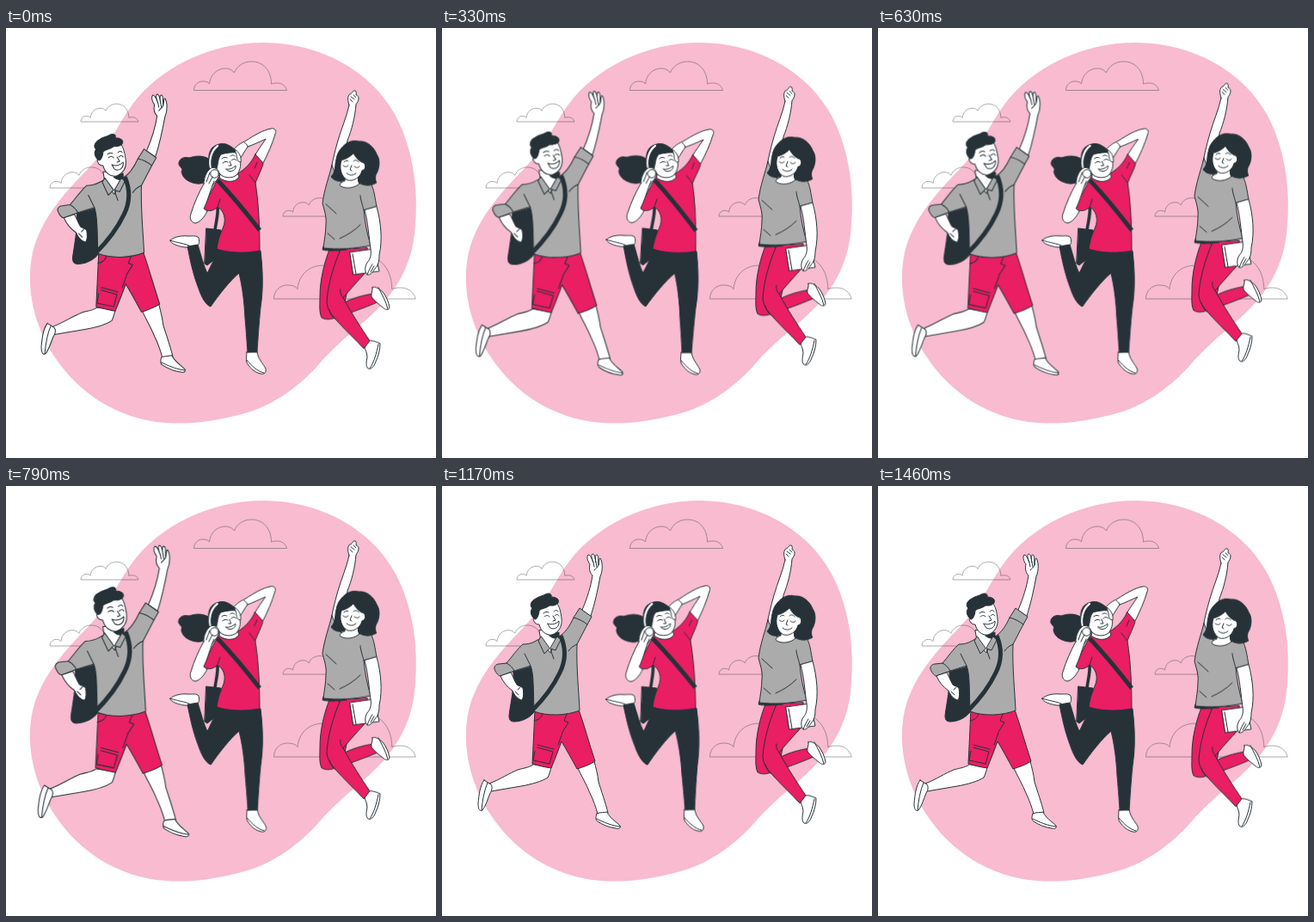
These frames come from a looping animation (500x500 px, 1.5 s). An HTML page:

```html
<!DOCTYPE html>
<html lang="en">
<head>
<meta charset="utf-8">
<title>Jumping students</title>
<style>
html, body { margin: 0; width: 100%; height: 100%; overflow: hidden; background: #fff; }
svg { display: block; width: 100%; height: 100%; }
.fig path, .fig circle { stroke: #263238; stroke-width: 1; stroke-linejoin: round; stroke-linecap: round; }
.fig .w { fill: #fff; }
.fig .g { fill: #ababab; }
.fig .p { fill: #e91e63; }
.fig .d { fill: #263238; }
.fig .n { fill: none; }
.fig .strap { fill: none; stroke-width: 5; stroke-linecap: butt; }
.fig .handle { fill: none; stroke-width: 3.6; stroke-linecap: butt; }
.fig .band { fill: none; stroke: #fff; stroke-width: 2.2; }
.clouds use { fill: none; stroke: #263238; stroke-width: .8; opacity: .5; }
#cloud { vector-effect: non-scaling-stroke; }
#man { transform-origin: 120px 244px; }
#girl { transform-origin: 252px 260px; }
</style>
</head>
<body>
<svg viewBox="0 0 500 500">
<defs>
  <path id="cloud" d="M0 0C0-6.500 5-10.500 10-10.500C14-10.500 17-9.500 18-7.500C19-18.500 27-25.500 37-25.500C41-25.500 45-23.500 47-20.500C50-28.500 58-33.500 67-33.500C81-33.500 90-22.500 90-7.500C92-8.500 95-8.500 97-8.500C103-8.500 107-4.500 108 0Z"/>
</defs>

<path fill="#f8bbd0" d="M300 17C365 17 425 50 453 102C476 146 480 196 475 240C470 284 446 316 418 340C396 359 378 374 362 393C338 420 306 441 274 449C240 458 212 461 185 459C130 455 84 424 57 383C33 347 22 302 31 261C41 220 71 189 96 163C121 137 131 110 147 89C178 47 236 17 300 17Z"/>

<g class="clouds">
  <use href="#cloud" transform="translate(218.500 72.500)"/>
  <use href="#cloud" transform="translate(87 109) scale(.62)"/>
  <use href="#cloud" transform="translate(51 186) scale(.72)"/>
  <use href="#cloud" transform="translate(322 219) scale(.64)"/>
  <use href="#cloud" transform="translate(311.500 315) scale(1.525)"/>
</g>

<g class="fig" id="man">
  <!-- legs and shoes -->
  <path class="w" d="M106 324C100 328 94 328 88 330C78 334 68 341 55 346L57 355L92 349C104 347 117 343 123 339C125 335 126 331 127 327Z"/>
  <path class="w" d="M49 342C52 344 55 346 57 347C59 350 58 354 56 357C53 364 51 372 47 377C43 379 42 374 42 369C43 359 44 349 49 342Z"/>
  <path class="n" d="M53 345C49 354 47 366 46 377"/>
  <path class="w" d="M158 328C162 337 168 347 172 357C176 365 179 374 181 381L193 380C190 368 185 354 182 344C181 335 179 328 177 320Z"/>
  <path class="w" d="M180 381C184 379 189 380 192 379C195 386 202 390 207 395C208 398 206 399 202 398C194 397 187 394 181 390C178 388 179 384 180 381Z"/>
  <path class="n" d="M180 387C188 391 197 395 207 396"/>
  <!-- shorts -->
  <path class="p" d="M108 260C107 282 106 303 105 323C112 325 119 327 127 328C131 318 135 308 139 297C145 307 151 318 157 329C164 327 172 324 178 320C171 299 166 280 159 260Z"/>
  <path class="n" d="M146 263L142 273L147 275L140 286M117 264C116 270 112 272 107 273M111 301L130 306M111 304L129 309L125 323M108 308L106 319L125 323M140 287L135 301"/>
  <!-- raised arm -->
  <path class="w" d="M163 144C169 130 173 117 175 104C171 100 171 95 172 91C169 87 168 82 170 80C173 80 174 85 176 89C174 84 173 80 175 79C178 79 178 85 179 89C178 84 178 80 180 80C183 81 181 88 182 92C183 90 182 84 184 84C187 88 187 99 184 105C181 121 178 136 173 151Z"/>
  <path class="n" d="M176 89L177 94M179 89L180 94M177 98C179 95 181 95 182 92"/>
  <!-- bag and shirt -->
  <path class="d" d="M83 216L104 210L110 257C107 267 95 274 84 274C79 274 78 271 78 267C80 251 84 235 83 216Z"/>
  <path class="g" d="M113 178C107 181 104 184 94 184C88 189 81 199 75 206L66 207C63 207 60 210 61 213C63 218 66 221 68 221L84 215L103 209C107 219 106 237 107 262C122 268 145 267 160 261C159 238 156 210 157 184L169 161L174 152L160 142L153 153C148 164 143 171 136 175Z"/>
  <path class="n" d="M75 206C79 208 82 211 84 215M153 153C158 154 164 157 169 161M103 209L96 195M157 184C152 186 149 189 147 192"/>
  <!-- neck, strap -->
  <path class="w" d="M113 168L115 180L126 194L134 176L134 168Z"/>
  <path class="d" d="M125 174L136 170L136 176C132 178 128 177 125 174Z"/>
  <path class="g" d="M115 175L112 180L119 195L125 189ZM134 175L138 179L132 191L126 189Z"/>
  <path class="n" d="M126 190L130 201"/>
  <path class="strap" d="M138 174C144 188 144 203 137 217C130 232 120 246 104 262"/>
  <!-- lowered arm -->
  <path class="w" d="M68 221C71 228 76 234 82 238C84 243 88 248 93 249C95 246 95 240 94 235C91 232 89 233 87 231C84 226 82 220 80 217Z"/>
  <path class="n" d="M88 237L91 234M85 239L89 243"/>
  <!-- head -->
  <path class="w" d="M110 143C110 148 111 151 110 153C106 151 105 155 108 159C110 161 112 161 113 161C115 169 121 174 128 173C136 170 140 163 139 154C138 147 137 140 133 136L119 136Z"/>
  <path class="d" d="M108 155C103 151 102 146 105 142C101 139 104 133 109 131C113 128 117 128 120 126C124 124 128 125 127 129C133 129 137 132 135 136C131 140 128 139 125 139C120 143 116 142 113 145C113 149 111 153 110 154Z"/>
  <path class="n" d="M118 148C120 146 122 146 124 147M130 146C132 144 134 144 135 146M119 152C121 150 124 150 125 152M131 151C133 149 135 149 136 151M129 151L132 156L129 157"/>
  <path class="w" d="M123 160C128 162 133 160 136 157C137 164 131 168 126 165Z"/>
</g>

<g class="fig" id="girl">
  <!-- ponytail, far bag -->
  <path class="d" d="M237 153C229 147 219 149 213 151C206 149 200 153 201 159C203 163 206 163 204 167C205 175 213 180 222 181C229 182 234 178 237 170Z"/>
  <path class="handle" d="M246 208C247 217 244 226 243 235"/>
  <path class="d" d="M233 233L250 235L251 262L234 276L231 274Z"/>
  <!-- shoes -->
  <path class="w" d="M191 247C195 243 204 241 212 242C217 242 222 241 224 244C225 248 225 252 222 253C216 253 213 256 208 255C201 254 191 251 191 247Z"/>
  <path class="n" d="M191 247C200 250 209 251 213 253"/>
  <path class="w" d="M280 377L292 376C293 385 299 390 302 396C303 401 300 403 296 402C288 400 283 394 280 389C279 384 280 380 280 377Z"/>
  <path class="n" d="M280 386C286 393 292 399 300 401"/>
  <!-- trousers -->
  <path class="d" d="M248 257L296 259C299 285 299 305 296 325C294 345 293 362 292 377L281 377C280 362 279 348 278 337C277 317 275 302 271 285C261 293 247 311 238 324C232 322 227 312 224 303C217 285 214 269 211 254L223 252C227 265 230 277 234 285Z"/>
  <!-- shirt -->
  <path class="p" d="M247 174C242 184 236 194 229 211C235 213 240 214 246 208C253 212 257 222 252 233C248 241 246 250 245 257C260 262 279 262 295 259C295 232 294 205 290 180C293 172 297 165 299 158C297 153 293 148 290 146C286 156 279 163 270 169Z"/>
  <path class="n" d="M290 180C288 177 285 174 283 171M289 163L292 156M246 208L249 199"/>
  <path class="w" d="M250 166L248 174C255 180 267 180 271 173L268 166Z"/>
  <!-- raised arm -->
  <path class="w" d="M265 141C270 135 275 133 279 131C288 125 300 118 308 117C312 116 315 119 313 123C310 134 304 147 299 157L290 147C293 142 297 136 302 129C295 132 287 136 281 138C278 142 275 148 272 152Z"/>
  <path class="n" d="M277 133C280 135 281 137 281 138"/>
  <!-- head -->
  <path class="w" d="M243 144C242 154 243 163 249 170C254 175 263 175 268 171C273 165 274 157 271 149C268 141 256 137 243 144Z"/>
  <path class="d" d="M239 163C234 155 235 144 240 139C246 134 254 133 260 137C264 139 267 142 269 145C262 144 253 146 250 147C246 152 247 157 245 163Z"/>
  <path class="band" d="M239 166C235 155 238 143 246 137"/>
  <path class="n" d="M240 165C237 155 240 145 248 138"/>
  <path class="w" d="M266 141C271 144 274 150 273 156C270 156 268 153 268 148Z"/>
  <path class="n" d="M251 152C253 150 255 150 257 151M261 149C263 147 265 148 266 149M252 157C254 155 256 155 258 156M262 154C264 152 266 152 268 154M260 155L262 160L259 160"/>
  <path class="w" d="M256 164C260 165 264 163 267 160C268 165 262 168 258 166Z"/>
  <!-- arm at the headphones -->
  <path class="w" d="M230 181C230 174 233 167 238 163C242 161 247 164 248 169C248 174 244 178 240 183C236 194 234 202 230 210L234 213C231 219 226 226 220 227C215 226 213 221 215 216C219 203 224 192 230 181Z"/>
  <circle class="w" cx="242.500" cy="169.500" r="4.800"/>
  <path class="n" d="M233 179L237 168M236 181L240 173M240 183L242 178"/>
  <path class="strap" d="M246 177C261 193 278 213 295 235"/>
</g>

<g class="fig" id="woman">
  <!-- far leg -->
  <path class="p" d="M376 258C370 273 365 294 365 312C365 322 364 331 367 337C372 340 378 339 383 337C399 332 416 326 432 319L427 309C415 311 404 314 394 319L400 290L400 262Z"/>
  <path class="w" d="M426 302C430 300 434 304 438 307C442 312 445 319 446 325C445 329 441 328 438 325C433 321 428 317 425 313C424 308 427 306 426 302Z"/>
  <path class="n" d="M433 302C437 310 442 318 444 327"/>
  <!-- near leg -->
  <path class="w" d="M420 365C424 362 430 365 435 367C435 374 433 382 430 388C428 394 424 398 421 396C418 394 419 388 420 383C420 377 417 374 417 371Z"/>
  <path class="n" d="M433 368C431 378 428 389 423 396"/>
  <path class="p" d="M389 258C380 278 374 301 373 319C374 330 380 335 386 342C396 353 407 363 416 373L423 364C413 349 403 334 392 314C402 302 415 288 424 278L420 256Z"/>
  <path class="n" d="M392 314C389 310 388 307 389 304M376 328C377 333 380 337 383 339"/>
  <!-- book -->
  <path class="w" d="M400 261L428 257L434 283L404 287Z"/>
  <path class="n" d="M403 263L407 286"/>
  <!-- raised arm -->
  <path class="w" d="M399 90C397 84 397 79 400 77C403 77 402 73 406 73C408 74 407 77 407 78C411 79 411 84 407 89C406 103 402 119 397 131C395 145 391 160 388 171L376 177C378 161 382 145 386 131C390 117 396 104 399 90Z"/>
  <path class="n" d="M401 80L405 83M404 78L407 81M400 83L403 86"/>
  <!-- shirt -->
  <path class="d" d="M369 254L368 258C374 260 384 259 396 258Z"/>
  <path class="g" d="M379 160C376 172 370 188 368 204C370 212 373 220 372 228C372 238 370 247 369 256C385 258 405 257 424 253C420 240 417 225 416 212L431 208C429 198 428 187 424 181C419 178 415 179 411 181L391 182C387 175 382 168 379 160Z"/>
  <path class="n" d="M416 212C414 204 412 199 412 195M372 205L384 216M388 245C397 241 405 236 412 229M374 239L382 246"/>
  <!-- hair and face -->
  <path class="d" d="M390 140C395 133 403 130 410 132C420 131 428 139 431 147C436 154 434 165 430 171C429 176 430 179 431 180C425 184 417 184 412 181L394 177C389 180 381 178 378 173C384 167 382 160 384 153C385 147 387 143 390 140Z"/>
  <path class="w" d="M395 170L394 178C389 180 387 182 389 184C396 188 406 186 411 181C409 179 409 176 410 171Z"/>
  <path class="w" d="M404 146C399 151 394 153 390 154C387 164 390 173 397 177C404 179 412 174 414 166C418 165 419 160 416 157C411 156 407 151 404 146Z"/>
  <path class="n" d="M393 156C395 154 397 154 398 155M404 155C406 153 409 154 410 156M392 160C394 162 397 162 398 160M405 161C407 163 410 163 411 161M402 160L400 165L402 166M396 169C399 172 404 172 407 169"/>
  <!-- lowered arm -->
  <path class="w" d="M417 212C421 226 422 244 424 257C425 263 424 269 420 273C417 278 417 284 420 287C424 288 427 283 429 280C433 276 434 271 434 264C438 247 436 226 431 208Z"/>
  <path class="n" d="M420 287C422 282 424 278 426 275M424 284L428 277"/>
</g>
</svg>
<script>
const LOOP = { duration: 1500, iterations: Infinity, delay: -18, easing: 'linear' };

// Each step is [offset, value].
const play = (id, fn, unit, steps) =>
  document.getElementById(id).animate(
    steps.map(([offset, v]) => ({ offset, transform: `${fn}(${v}${unit})` })), LOOP);

play('man', 'scale', '', [[0, 1], [.1, 1.1], [.3, 1], [.4, 1], [.5, 1.1], [.6, 1], [1, 1]]);
play('girl', 'rotate', 'deg', [[0, 0], [.25, 1], [.75, -1], [1, 0]]);
play('woman', 'translateY', 'px', [[0, 0], [.5, -10], [1, 0]]);
</script>
</body>
</html>
```
